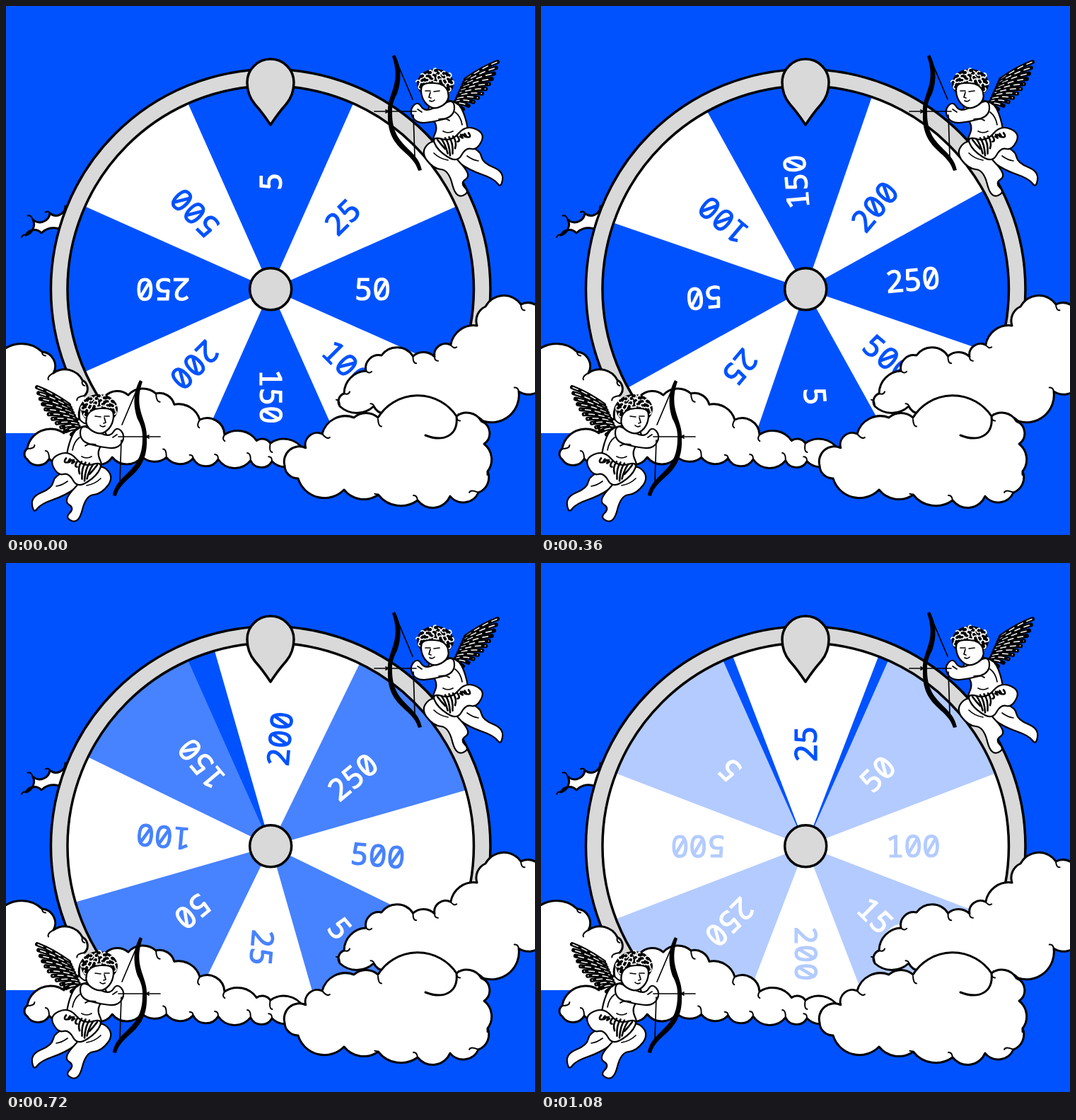
An HTML page for the animation above (3.3 s loop, 748 px wide and 748 px high).

```html
<!DOCTYPE html>
<html lang="en">
<head>
<meta charset="utf-8">
<title>Prize wheel</title>
<style>
  html, body { margin: 0; width: 100%; height: 100%; overflow: hidden; background: #0052ff; }
  svg { display: block; width: 100%; height: 100%; }
  text {
    font: 500 43px "Noto Sans Mono", "DejaVu Sans Mono", monospace;
    text-anchor: middle; stroke: currentColor; fill: currentColor; stroke-width: 1.2;
  }
  .ink { fill: none; stroke: #000; stroke-width: 1.7; stroke-linecap: round; stroke-linejoin: round; }
  .paper { fill: #fff; }
  .metal { fill: #d9d9d9; stroke: #000; stroke-width: 3.5; stroke-linejoin: round; }
</style>
</head>
<body>
<svg viewBox="0 0 748 748">
  <clipPath id="above"><path d="M0 0H748V632H0Z"/></clipPath>
  <g id="back"></g>
  <g clip-path="url(#above)">
    <g transform="translate(374.2 400.3)">
      <circle r="287" fill="#fff"/>
      <g id="wheel"></g>
      <path id="veil" fill="#fff"/>
      <circle r="299" fill="none" stroke="#000" stroke-width="27"/>
      <circle r="299" fill="none" stroke="#d9d9d9" stroke-width="20"/>
      <circle class="metal" r="29.5"/>
    </g>
  </g>
  <path class="metal" d="M374 168Q362 150 352 139Q341 126 341 108A33 33 0 0 1 407 108Q407 126 396 139Q386 150 374 168Z"/>
  <g id="front"></g>
  <g id="cherub">
    <g id="wing"></g>
    <g id="body"></g>
    <path class="ink" d="M593 120l7 0M605 121l8-1M600 122l-2 7l3 1M599 134q4 2 7-1M612 160q10-2 15 2M618 177q7 4 14 0M635 150q8 6 10 18M582 146l6 4M605 208q8 8 20 10M652 212q8 6 16 7"/>
    <path d="M546 71L550 69C562 92 557 112 553 124C545 138 546 148 546 152C546 200 582 200 588 232L583 233C575 204 538 204 540 152C538 124 560 112 546 71Z"/>
    <path class="ink" d="M550 73L575 132M576 154L578 214M521 149H580M537 147l8 4M537 151l8-4"/>
  </g>
  <use href="#cherub" transform="translate(739 460) scale(-1 1)"/>
</svg>

<script>
const STEP = 60, STEPS = 18, LOOP = 3300, TURN = 675;
const BLUE = '#0052ff', HALF_BLUE = 24, RADIUS = 287;
const byId = id => document.getElementById(id);

let seed = 11;
const random = () => (seed = seed * 16807 % 2147483647) / 2147483647;
const mix = (a, b, t) => a + (b - a) * t;

function add(parent, tag, attributes, text = '') {
  const node = document.createElementNS('http://www.w3.org/2000/svg', tag);
  for (const [key, value] of Object.entries(attributes)) node.setAttribute(key, value);
  node.textContent = text;
  parent.append(node);
}

// Angles run clockwise from the top of the wheel.
function sector(from, to) {
  const rim = degrees => {
    const a = degrees * Math.PI / 180;
    return `${RADIUS * Math.sin(a)} ${-RADIUS * Math.cos(a)}`;
  };
  return `M0 0L${rim(from)}A${RADIUS} ${RADIUS} 0 ${+(to - from > 180)} 1 ${rim(to)}Z`;
}

const wheel = byId('wheel'), veil = byId('veil');
[5, 25, 50, 100, 150, 200, 250, 500].forEach((prize, i) => {
  const angle = i * 45, onBlue = i % 2 === 0;
  if (onBlue) add(wheel, 'path', { d: sector(angle - HALF_BLUE, angle + HALF_BLUE), fill: BLUE });
  add(wheel, 'text', {
    x: prize > 5 && prize < 100 ? 144 : 152, y: 15.3, color: onBlue ? '#fff' : BLUE,
    transform: `rotate(${angle - 90})`
  }, prize);
});
veil.setAttribute('d', sector(HALF_BLUE, 360 - HALF_BLUE));

// Splits a clockwise outline into uneven puffs, with a crease at some of the joints.
function cloud(parent, outline, size, tail = '') {
  let edge = `M${outline[0]}`, creases = '', [x, y] = outline[0];
  outline.slice(1).forEach((end, i) => {
    const start = outline[i];
    const dx = end[0] - start[0], dy = end[1] - start[1], length = Math.hypot(dx, dy);
    const count = Math.max(1, Math.round(length / size));
    for (let j = 1; j <= count; j++) {
      const t = j === count ? 1 : (j + (random() - 0.5) * 0.5) / count;
      const nextX = start[0] + dx * t, nextY = start[1] + dy * t;
      const r = Math.hypot(nextX - x, nextY - y) * mix(0.55, 0.75, random());
      edge += `A${r} ${r} 0 0 1 ${nextX} ${nextY}`;
      [x, y] = [nextX, nextY];
      const depth = size * 0.3 * random();
      if (random() < 0.6) {
        creases += `M${x} ${y}q${-dy / length * depth} ${dx / length * depth} ${dx / length * 5 - dy / length * depth} ${dy / length * 5 + dx / length * depth}`;
      }
    }
  });
  add(parent, 'path', { class: 'paper', d: edge + tail });
  add(parent, 'path', { class: 'ink', d: edge, 'stroke-width': 3, style: 'stroke-width:3' });
  add(parent, 'path', { class: 'ink', d: creases, style: 'stroke-width:2' });
}

const front = byId('front');
cloud(byId('back'), [[84, 283], [62, 293], [38, 302], [28, 324], [50, 321], [90, 331]], 30);
cloud(front, [[-8, 490], [51, 489], [67, 519], [108, 529], [111, 551]], 48, 'L100 604H-8Z');
cloud(front, [[30, 626], [82, 604], [140, 552], [212, 548], [274, 585], [309, 606], [420, 627],
  [412, 645], [300, 641], [192, 637], [30, 641], [30, 626]], 42);
cloud(front, [[478, 548], [509, 516], [531, 494], [606, 496], [666, 452], [678, 425],
  [728, 422], [760, 440], [760, 538], [725, 545], [675, 587], [520, 566], [472, 566], [478, 548]], 44);
cloud(front, [[394, 650], [447, 605], [492, 582], [526, 582], [637, 580], [672, 587], [681, 658],
  [668, 688], [582, 699], [478, 684], [413, 668], [394, 650]], 46);
add(front, 'path', { class: 'paper', d: 'M526 584A66 66 0 0 1 637 580L626 606Z' });
add(front, 'path', { class: 'ink', style: 'stroke-width:3', d: 'M526 582A66 66 0 0 1 637 580C640 608 618 617 593 607' });

// Feathers fan from the shoulder to a curved wing edge.
for (let i = 0; i <= 10; i++) {
  const t = i / 10, u = 1 - t;
  const tipX = u * u * 695 + 2 * u * t * 686 + t * t * 646;
  const tipY = u * u * 79 + 2 * u * t * 122 + t * t * 146;
  const rootX = mix(650, 633, t), rootY = mix(104, 142, t);
  const feather = `M${rootX} ${rootY}Q${mix(rootX, tipX, 0.5)} ${mix(rootY, tipY, 0.5) - 4} ${tipX} ${tipY}`;
  add(byId('wing'), 'path', { class: 'ink', d: feather, style: 'stroke-width:6' });
  add(byId('wing'), 'path', { d: feather, fill: 'none', stroke: '#fff', 'stroke-width': 1.5, 'stroke-dasharray': '9 5', 'stroke-dashoffset': i * 4 });
}

// A rounded closed shape guided by a few corner points.
const body = byId('body');
function limb(...corners) {
  const middle = i => {
    const [a, b] = [corners[i], corners[(i + 1) % corners.length]];
    return `${mix(a[0], b[0], 0.5)} ${mix(a[1], b[1], 0.5)}`;
  };
  const d = `M${middle(corners.length - 1)}` + corners.map((c, i) => `Q${c} ${middle(i)}`).join('');
  add(body, 'path', { class: 'ink', d, style: 'fill:#fff;stroke-width:2.2' });
}
limb([640, 196], [670, 203], [674, 222], [704, 234], [700, 258], [690, 244], [655, 232], [630, 214]);
limb([606, 186], [586, 206], [604, 230], [626, 232], [636, 272], [656, 264], [642, 250], [658, 240], [634, 212]);
limb([604, 132], [594, 150], [612, 170], [600, 194], [630, 202], [656, 192], [650, 156], [638, 134]);
limb([602, 184], [630, 192], [650, 168], [678, 180], [666, 204], [650, 200], [638, 222], [610, 204]);
for (let i = 0; i < 9; i++) {
  const x = 610 + 5.5 * i, y = 189 - 1.2 * i;
  add(body, 'path', { class: 'ink', d: `M${x} ${y}q6 8 ${11 - 2 * i} ${mix(13, 25, Math.sin(i * 0.7))}`, style: 'stroke-width:2.6' });
}
limb([634, 132], [634, 156], [604, 164], [580, 166], [570, 148], [582, 134], [592, 150], [614, 140]);
add(body, 'ellipse', { cx: 607, cy: 110, rx: 26, ry: 21 });
for (let i = 0; i < 40; i++) {
  const a = i * 2.4, reach = Math.sqrt(i / 40);
  add(body, 'path', {
    d: 'M-3 1A3 3 0 1 1 2 2', fill: 'none', stroke: '#fff', 'stroke-width': 1.6,
    transform: `translate(${607 + 25 * reach * Math.cos(a)} ${110 + 20 * reach * Math.sin(a)}) rotate(${i * 67})`
  });
}
limb([589, 108], [586, 122], [592, 138], [607, 147], [628, 134], [622, 110]);

function draw() {
  const step = Math.min(STEPS, Math.floor(performance.now() % LOOP / STEP));
  const t = step / STEPS;
  wheel.setAttribute('transform', `rotate(${TURN * t * t * (3 - 2 * t)})`);
  veil.setAttribute('opacity', Math.min(0.7, Math.max(0, (step - 9) * 0.0933)));
  requestAnimationFrame(draw);
}
draw();
</script>
</body>
</html>
```
